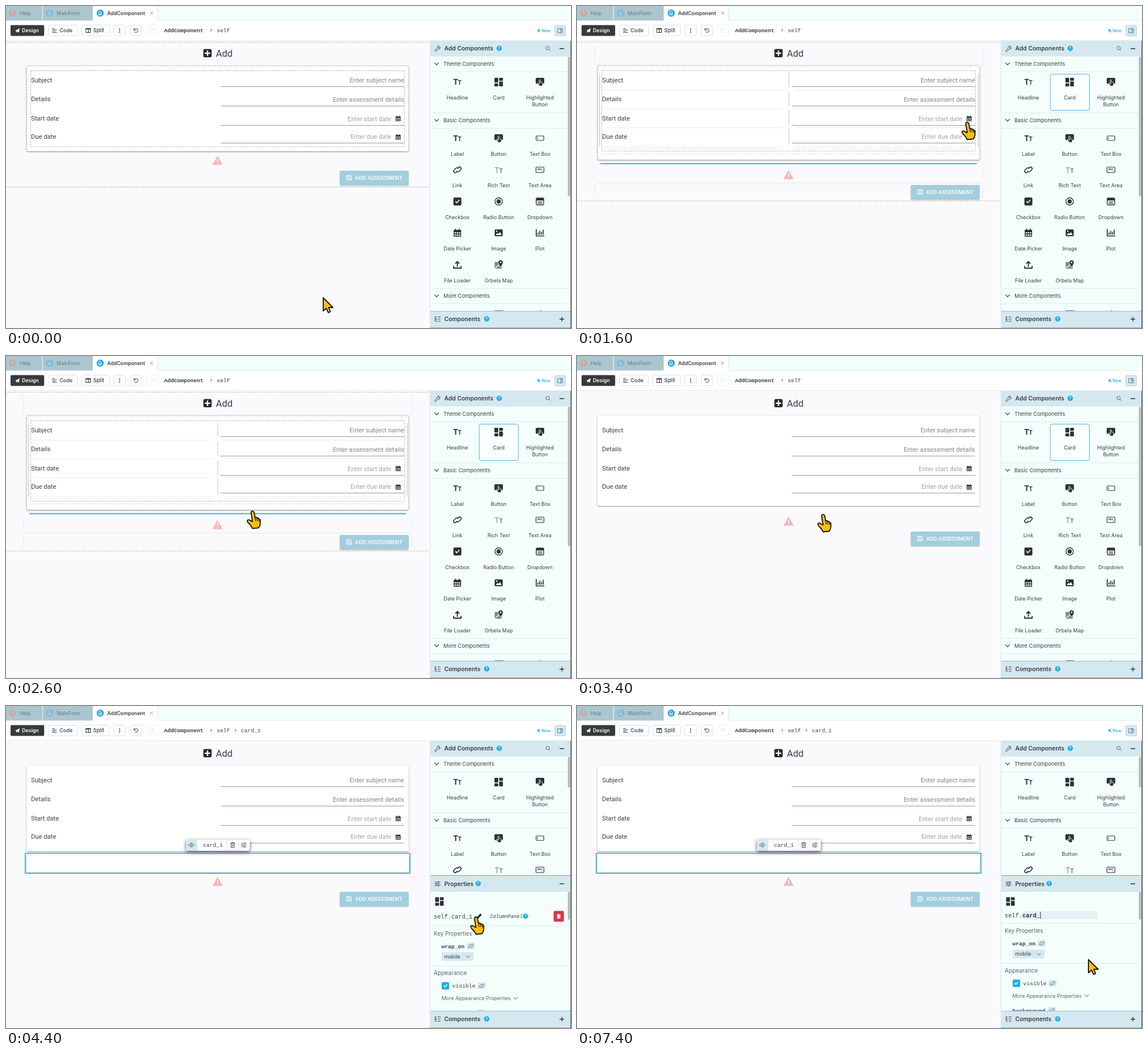
These frames come from a looping animation (992 by 565 pixels, 8000 ms). An HTML page with a canvas:

```html
<!DOCTYPE html>
<html lang="en">
<head>
<meta charset="utf-8">
<title>Form designer</title>
<style>
html, body { margin: 0; width: 100%; height: 100%; overflow: hidden; background: #fff; }
canvas { display: block; width: 100%; height: 100%; }
</style>
</head>
<body>
<canvas id="stage" width="992" height="565"></canvas>
<script>
const ctx = document.getElementById('stage').getContext('2d');
const LOOP = 8000, STEP = 200;
const INK = '#2d3135', LABEL = '#3a3e42', BLUE = '#1eaee6', BAR = '#d5e8f0', MINT = '#f4fffc', EDGE = '#deebe9';
const UI = 'Inter, sans-serif', BODY = 'Roboto, sans-serif', MONO = '"Liberation Mono", monospace';

function box(x, y, w, h, fill, { r = 0, stroke, lw = 1, dash = [] } = {}) {
  ctx.beginPath();
  ctx.roundRect(x, y, w, h, r);
  if (fill) { ctx.fillStyle = fill; ctx.fill(); }
  if (stroke) {
    ctx.strokeStyle = stroke;
    ctx.lineWidth = lw;
    ctx.setLineDash(dash);
    ctx.stroke();
    ctx.setLineDash([]);
  }
}

function line(x1, y1, x2, y2, color, lw = 1, dash = []) {
  ctx.beginPath();
  ctx.moveTo(x1, y1);
  ctx.lineTo(x2, y2);
  ctx.strokeStyle = color;
  ctx.lineWidth = lw;
  ctx.setLineDash(dash);
  ctx.stroke();
  ctx.setLineDash([]);
}

function disc(x, y, r, color) {
  ctx.beginPath();
  ctx.arc(x, y, r, 0, 7);
  ctx.fillStyle = color;
  ctx.fill();
}

function text(str, x, y, size, { font = UI, color = LABEL, style = '', align = 'left' } = {}) {
  ctx.font = `${style} ${size}px ${font}`;
  ctx.fillStyle = color;
  ctx.textAlign = align;
  ctx.fillText(str, x, y);
}

function shape(x, y, d, { fill, stroke, lw = 1.3, scale = 1 } = {}) {
  const path = new Path2D(d);
  ctx.save();
  ctx.translate(x, y);
  ctx.scale(scale, scale);
  ctx.lineJoin = ctx.lineCap = 'round';
  if (fill) { ctx.fillStyle = fill; ctx.fill(path, 'evenodd'); }
  if (stroke) { ctx.strokeStyle = stroke; ctx.lineWidth = lw; ctx.stroke(path); }
  ctx.restore();
}

function shadowed(blur, dy, color, draw) {
  ctx.save();
  ctx.shadowBlur = blur;
  ctx.shadowOffsetY = dy;
  ctx.shadowColor = color;
  draw();
  ctx.restore();
}

function clipped(x, y, w, h, draw) {
  ctx.save();
  ctx.beginPath();
  ctx.rect(x, y, w, h);
  ctx.clip();
  draw();
  ctx.restore();
}

const HAND = 'M-2.5 1.5Q-2-1.5 .5-.8 2.5 0 3 2L4.5 10Q7 9 8 11.5 10.5 10.5 11.5 13 14 13 13.8 16L13.5 22Q13 26 10.5 28.5L0 29.5Q-2 25-5 22-9.5 18.5-9 15.5-7.5 13-4 15.5L0 17.5Z';
const KNUCKLES = 'M4.5 10L5.5 16M8 11.5L8.8 16M11.5 13L11.8 17';
const ARROW = 'M0 0V23L5.5 18.5 9 26 12.5 24.5 9.5 17H17Z';
const CHEVRON = 'M-3.5-1.8L0 1.8 3.5-1.8';
const LINK = 'M-.5 2.6L-2 4.1A2.6 2.6 0 0 1-5.8.3L-2.8-2.7A2.6 2.6 0 0 1 1-2.7M.5-2.6L2-4.1A2.6 2.6 0 0 1 5.8-.3L2.8 2.7A2.6 2.6 0 0 1-1 2.7';
const SLIDERS = 'M-4.5-3H4.5M-4.5 0H4.5M-4.5 3H4.5M2-4V-2M-2-1V1M1 2V4';
const TREE = 'M-4-4V3.5H-1M-4-.2H-1M-4-4H-2M1-4H5M1-.2H5M1 3.5H5';
const TRASH = 'M-4-3H4M-1.5-3V-4.5H1.5V-3M-3-3V4.5H3V-3M-1-1V2.5M1-1V2.5';

function typeIcon(x, y, color, style) {
  text('T', x - 7.5, y + 5, 13.5, { style, color });
  text('T', x + .8, y + 5, 10, { style: '700', color: color === INK ? INK : '#777' });
}

const icons = {
  type: (x, y) => typeIcon(x, y, INK, '700'),
  rich: (x, y) => typeIcon(x, y, '#9a9d9f', '500'),
  card(x, y) {
    box(x - 7.5, y - 7, 6.7, 8.3, INK, { r: 1 });
    box(x + .8, y - 7, 6.7, 5.2, INK, { r: 1 });
    box(x - 7.5, y + 2.7, 6.7, 5.2, INK, { r: 1 });
    box(x + .8, y - .4, 6.7, 8.3, INK, { r: 1 });
  },
  button(x, y) {
    box(x - 7.5, y - 7, 15, 10.5, INK, { r: 2 });
    shape(x - .5, y - 3.5, HAND, { fill: INK, stroke: '#fff', lw: 2.4, scale: .38 });
  },
  field(x, y) {
    box(x - 6.7, y - 4, 13.4, 8, null, { r: 1.5, stroke: INK, lw: 1.2 });
    line(x - 4, y - 1.7, x - 4, y + 1.7, INK);
  },
  link: (x, y) => shape(x, y, LINK, { stroke: INK, lw: 1.6 }),
  area(x, y) {
    box(x - 7, y - 4.8, 14, 9.6, null, { r: 1, stroke: INK, lw: 1.1 });
    text('abc', x - 5, y + .8, 5, { style: '700' });
    line(x + 3, y + 3, x + 5, y + 1, INK, .8);
  },
  check(x, y) {
    box(x - 7, y - 7, 14, 14, INK, { r: 2 });
    shape(x, y, 'M-3 0L-1 2.3 3.2-2.2', { stroke: '#fff', lw: 1.6 });
  },
  radio(x, y) {
    shape(x, y, 'M-6.5 0A6.5 6.5 0 1 1 6.5 0A6.5 6.5 0 1 1-6.5 0', { stroke: INK, lw: 1.4 });
    disc(x, y, 3.7, INK);
  },
  list(x, y) {
    box(x - 6.5, y - 6, 13, 12, null, { r: 1.5, stroke: INK, lw: 1.4 });
    box(x - 6.5, y - 6, 13, 4.3, INK);
    line(x - 4, y + .8, x + 4, y + .8, INK, 1.2);
    line(x - 4, y + 3.3, x + 4, y + 3.3, INK, 1.2);
  },
  date: (x, y) => calendar(x, y, 1.35),
  image(x, y) {
    box(x - 7, y - 6, 14, 12, INK, { r: 1.5 });
    shape(x, y, 'M-5.3 4L-2 0 0 2 2-1.5 5.3 4Z', { fill: '#fff' });
    disc(x - 3.4, y - 3, 1.3, '#fff');
  },
  plot: (x, y) => shape(x, y, 'M-6.5-6V5.5H7M-3.3 2.5V0M-.3 2.5V-3M2.7 2.5V-1M5.7 2.5V-5', { stroke: INK, lw: 1.7 }),
  upload(x, y) {
    shape(x, y, 'M0 3V-5M-3-2.5L0-5.7 3-2.5M-6.5 3V6H6.5V3', { stroke: INK, lw: 1.9 });
  },
  map(x, y) {
    box(x - 7, y - 5, 12.5, 12, '#85898b', { r: 1 });
    line(x - 6, y + 6, x + 5, y - 4, '#fff', 1.4);
    shape(x + 3.5, y - 1, 'M0 5Q-4.2-.5-4.2-3A4.2 4.2 0 0 1 4.2-3Q4.2-.5 0 5Z', { fill: INK, stroke: '#fff', lw: .7 });
    disc(x + 3.5, y - 4, 1.4, '#fff');
  }
};

function calendar(x, y, s) {
  shape(x, y, 'M-4.8-3.8H4.8V5H-4.8ZM-3.8-.8V.8H-1.8V-.8ZM-1-.8V.8H1V-.8ZM1.8-.8V.8H3.8V-.8ZM-3.8 2V3.8H-1.8V2ZM-1 2V3.8H1V2ZM1.8 2V3.8H3.8V2Z', { fill: INK, scale: s });
  shape(x, y, 'M-2.4-5V-3.5M2.4-5V-3.5', { stroke: INK, lw: 1.2, scale: s });
}

function help(x, y) {
  disc(x, y, 4.7, BLUE);
  text('?', x, y + 2.5, 7, { color: '#fff', style: '600', align: 'center' });
}

function linkChip(x, y) {
  box(x - 7, y - 6, 14, 12, BAR, { r: 2 });
  shape(x, y, LINK, { stroke: '#56666e', lw: 1.5, scale: .62 });
}

function tabs() {
  box(0, 0, 992, 26, '#f2fffb');
  box(0, 0, 63.5, 25.5, '#abc6cf');
  box(64.5, 0, 88, 25.5, '#abc6cf');
  box(152.5, 0, 114, 26, '#fff');
  line(266.5, 0, 266.5, 25, '#d8e6e6');
  line(267, 25.5, 992, 25.5, '#e1efed');
  disc(11.5, 12.5, 6, '#c8aaa5');
  text('?', 11.5, 15.4, 8, { color: '#e3d1cd', style: '600', align: 'center' });
  [[76.5, '#79b9d5', '#c0dce7'], [165.5, '#20a3df', '#fff']].forEach(([x, bg, fg]) => {
    disc(x, 12.5, 6.2, bg);
    shape(x, 12.5, 'M-2.3-3.2H.8L2.3-1.7V3.2H-2.3ZM-1 .2H1M-1 1.7H1', { stroke: fg, lw: .9 });
  });
  text('Help', 24, 15.6, 8.8, { color: '#637a83' });
  text('MainForm', 89, 15.6, 8.8, { color: '#637a83' });
  text('AddComponent', 177.5, 15.6, 8.75, { style: '600' });
  shape(255.5, 12.5, 'M-2.3-2.3L2.3 2.3M2.3-2.3L-2.3 2.3', { stroke: '#87959a', lw: 1 });
}

function toolbar(selected) {
  box(0, 26, 992, 35, '#fff');
  line(0, 60.5, 992, 60.5, '#e5eced');
  box(8, 33.5, 59, 19, '#38393b', { r: 2 });
  shape(20, 43, 'M-4 .5L4-4 2.7 3.5 0 2-1.7 4V1.3Z', { fill: '#fff' });
  text('Design', 28, 46.2, 8.8, { color: '#fff', style: '600' });
  [[74.5, 51], [133.5, 48], [189.5, 20], [218.5, 20], [246.5, 20]].forEach(([x, w], i) =>
    box(x, 33.5, w, 18.5, '#fff', { r: 2, stroke: i === 4 ? '#edf2f3' : '#d4e3e9' }));
  shape(85, 43, 'M-3.5-3.5H0M-3.5-1.2H4M-3.5 1.2H1.5M-3.5 3.5H4', { stroke: INK, lw: .9 });
  text('Code', 94, 46.2, 9, { style: '500' });
  shape(144.5, 43, 'M-4-3.5H4V3.5H-4ZM0-3.5V3.5M-4-2.4H4', { stroke: INK, lw: 1 });
  text('Split', 153, 46.2, 9.2, { style: '500' });
  [-3, 0, 3].forEach(d => disc(199.5, 43 + d, .9, INK));
  shape(228, 43, 'M-3.3-3.5V-.8H-.6M-3-1A3.4 3.4 0 1 1-2.2 2.3', { stroke: INK, lw: 1 });
  shape(256, 43, 'M3.3-3.5V-.8H.6M3-1A3.4 3.4 0 1 0 2.2 2.3', { stroke: '#e5eaec', lw: 1 });
  const crumb = (s, x, style) => text(s, x, 45.8, 9.6, { font: MONO, style });
  const next = x => shape(x, 42.5, 'M-1.2-2.2L1 0-1.2 2.2', { stroke: INK, lw: .9 });
  crumb('AddComponent', 277.5, 'bold');
  next(360.5);
  crumb('self', 370, '');
  if (selected) { next(403); crumb('card_1', 412.5, ''); }
  shape(935, 43, 'M0-3.5Q.4-.4 3 0 .4.4 0 3.5-.4.4-3 0-.4-.4 0-3.5ZM3 1.5V4M1.8 2.8H4.2M3-4V-2', { fill: BLUE, stroke: BLUE, lw: .5, scale: .85 });
  text('New', 940.3, 45.8, 7.3, { color: BLUE, style: '500' });
  box(963.5, 34, 19, 18.5, BAR, { r: 2, stroke: '#b9d5e1' });
  shape(973, 43.3, 'M-4-3.7H4V3.7H-4ZM1-3.7V3.7M2.2-1.7H3M2.2 0H3', { stroke: '#46748a', lw: .9 });
}

function dragGuides() {
  const pale = '#e9eaec', mid = '#bfc1c3';
  [63.5, 342].forEach(y => line(0, y, 744, y, '#e0b48f', 1, [2.5, 1.5]));
  [31, 713].forEach(x => [[68, 99], [286, 305], [314, 337]].forEach(([a, b]) => line(x, a, x, b, pale)));
  [103, 310.5].forEach(y => line(31, y, 713, y, pale));
  [39.5, 704.5].forEach(x => line(x, 118, x, 246, mid));
  [[117, 142], [150, 176], [183, 209], [216, 243]].forEach(([a, b]) => line(372, a, 372, b, mid));
  [147.5, 180.5, 213.5, 247, 250].forEach(y => {
    line(47, y, 361, y, pale);
    line(383, y, 694, y, pale);
  });
  line(43, 259.5, 700, 259.5, pale);
  line(41, 276.6, 702, 276.6, '#2ea7d1', 1.8);
}

function form({ grow, shift, dashed, dragging, selected }) {
  box(0, 61, 744, 504, '#fafafd');
  box(346.5, 75.5, 14.5, 14.5, '#26282a', { r: 2.5 });
  shape(353.8, 82.8, 'M-4 0H4M0-4V4', { stroke: '#fff', lw: 2.2 });
  text('Add', 368.5, 88.5, 16.5, { font: BODY });

  const cardPanel = (y, h) => shadowed(2.5, 1, 'rgba(0,0,0,.42)', () => box(36, y, 671, h, '#fffffe', { r: 2 }));
  cardPanel(105, 150 + grow);
  if (dashed) {
    const dash = [2.5, 1.5], tone = '#b9b6b1';
    if (!dragging) [63.5, 317.5].forEach(y => line(0, y, 744, y, '#b0b2b4', 1, dash));
    box(36.5, 105, 670.5, 150 + grow, null, { r: 2, stroke: tone, dash });
    box(43.5, 113.5, 656, 133.5 + grow / 2, null, { stroke: tone, dash });
  }
  if (dragging) dragGuides();

  [['Subject', 'Enter subject name', 129.5, 141.5],
   ['Details', 'Enter assessment details', 163, 175.5],
   ['Start date', 'Enter start date', 196.5, 209.5],
   ['Due date', 'Enter due date', 229, 240.5]].forEach(([label, hint, y, rule], i) => {
    const dated = i > 1;
    text(label, 44, y + 4.2, 11.2, { font: BODY });
    text(hint, dated ? 676.5 : 699, y + (i % 3 ? 5 : 4.2), 11.2,
      { font: BODY, color: dated ? '#a3a3a3' : '#858585', align: 'right' });
    line(377, rule, 699, rule, '#989898');
    if (dated) calendar(688.5, y + .8, .92);
  });

  if (selected) {
    cardPanel(262, 30);
    box(33.8, 258.5, 675.5, 35, null, { stroke: '#2aabdc', lw: 1.7 });
    quickBar();
  }
  shape(371.5, 271 + shift, 'M0-7L8 7.2H-8Z', { fill: '#f8b5b5', stroke: '#f8b5b5', lw: 1 });
  shape(371.5, 271 + shift, 'M0-2.5V2M0 4.7V4.9', { stroke: '#fff', lw: 1.7 });
  shadowed(2, 1, 'rgba(0,0,0,.2)', () => box(586, 289 + shift, 121, 25.7, '#a2cedd', { r: 2 }));
  shape(602.5, 301.3 + shift, 'M-4-4H2.5L4-2.5V4H-4ZM-2-4V-1.3H1.7V-4M-2 4V1H2V4', { stroke: '#fff', lw: 1 });
  text('ADD ASSESSMENT', 613, 304.7 + shift, 9.65, { font: BODY, color: '#fff', style: '500' });
}

function quickBar() {
  shadowed(6, 2, 'rgba(0,0,0,.65)', () => box(316, 234.5, 112, 19.5, '#fff', { r: 3 }));
  box(316, 234.5, 20, 19.5, BAR, { r: [3, 0, 0, 3] });
  shape(325.5, 244, 'M-5 0Q0-7 5 0Q0 7-5 0M-1.6 0A1.6 1.6 0 1 1 1.6 0A1.6 1.6 0 1 1-1.6 0', { stroke: '#4b565b', lw: .9 });
  text('card_1', 346, 247.2, 9.65, { font: MONO });
  [388, 408].forEach(x => line(x, 235, x, 254, '#d5e4ea'));
  shape(398, 244, TRASH, { stroke: INK, lw: .8 });
  shape(417.5, 244, SLIDERS, { stroke: INK, lw: .8 });
}

const sections = [
  ['Theme Components', 88, [
    ['type', 'Headline', 133], ['card', 'Card', 133], ['button', 'Highlighted Button', 133]]],
  ['Basic Components', 187, [
    ['type', 'Label', 232], ['button', 'Button', 232], ['field', 'Text Box', 232],
    ['link', 'Link', 287.5], ['rich', 'Rich Text', 287.5], ['area', 'Text Area', 287.5],
    ['check', 'Checkbox', 343], ['radio', 'Radio Button', 343], ['list', 'Dropdown', 343],
    ['date', 'Date Picker', 398], ['image', 'Image', 398], ['plot', 'Plot', 398],
    ['upload', 'File Loader', 454], ['map', 'Orbela Map', 454]]],
  ['More Components', 495, []]
];

function panelHead(title, y, h, glyph, helpX, open) {
  const mid = y + h / 2;
  box(744, y, 247, h, BAR);
  shape(757.5, mid, glyph, { stroke: INK, lw: .9 });
  text(title, 769.5, mid + 3.7, 10.25, { style: '600' });
  help(helpX, mid - .5);
  shape(976, mid, open ? 'M-3.5 0H3.5' : 'M-3.5 0H3.5M0-3.5V3.5', { stroke: INK, lw: 1.3 });
}

function palette(cardState) {
  box(744, 61, 248, 504, MINT);
  if (cardState) {
    box(831, 119.5, 68.7, 63.7, cardState === 'filled' ? BAR : '#f8fffe', { r: 3, stroke: '#4bb3da' });
  }
  sections.forEach(([title, top, items]) => {
    if (top > 88) line(744, top + .5, 986, top + .5, EDGE);
    line(744, top + 27.5, 986, top + 27.5, EDGE);
    shape(756, top + 13.5, CHEVRON, { stroke: INK, lw: 1.1 });
    text(title, 768, top + 17, 9.3);
    items.forEach(([icon, label, y], i) => {
      const x = [792.5, 865, 937.5][i % 3];
      icons[icon](x, y);
      const lines = label.length > 13 ? label.split(' ') : [label];
      lines.forEach((s, n) => text(s, x, y + 30.8 + n * 12, 9, { align: 'center' }));
    });
  });
  line(858, 534.5, 873, 534.5, '#8d9496', 1.4);
  line(937, 534.5, 940, 534.5, '#8d9496', 1);
}

function properties({ editing, name, picked, caret }) {
  box(744, 297, 247, 238, MINT);
  panelHead('Properties', 298, 28, SLIDERS, 829, true);
  line(744, 297.5, 991, 297.5, '#5cb4d5');
  icons.card(761, 342.5);
  const up = editing ? -4.5 : 0;
  const mono = (s, x, y, size, o) => text(s, x, y, size, { font: MONO, ...o });
  if (editing) {
    const caretX = 782.5 + name.length * 6.25;
    box(782, 360, 132, 14, '#e5f0f4');
    mono('self.', 751, 371, 10.3);
    if (picked) box(782, 361, 38, 12.5, '#1d58c9');
    mono(name, 782, 371, 10.3, { style: 'bold', color: picked ? '#fff' : INK });
    if (caret) line(caretX, 361, caretX, 373.5, INK);
  } else {
    mono('self.card_1', 751, 372.7, 10.3);
    shape(830.5, 369, 'M-5 5L-4 1.5 2.5-5 5-2.5-1.5 4Z', { fill: INK });
    mono('ColumnPanel', 850, 372, 8.65, { style: 'italic' });
    help(912, 368.7);
    box(961.5, 359.5, 18, 19, '#dc3545', { r: 2.5 });
    shape(970.5, 369, TRASH, { fill: '#fff', stroke: '#fff', lw: 1.1, scale: .8 });
  }
  const grey = { color: '#5b6367' };
  const rule = y => line(744, y + up, 986, y + up, EDGE);
  rule(386);
  text('Key Properties', 751, 402.7 + up, 9.75, grey);
  mono('wrap_on', 764.5, 424.5 + up, 9.65, { style: 'bold' });
  linkChip(816, 421 + up);
  box(765, 432 + up, 56, 15, BAR, { r: 2 });
  text('mobile', 769.5, 442.8 + up, 8.9);
  shape(811, 440 + up, CHEVRON, { stroke: INK, lw: 1, scale: .8 });
  rule(456);
  text('Appearance', 751, 472.4 + up, 10.1, grey);
  box(765, 484.5 + up, 13, 13, BLUE, { r: 2 });
  shape(771.5, 491 + up, 'M-2.6 0L-.8 1.9 2.8-1.9', { stroke: '#fff', lw: 1.4 });
  mono('visible', 783.5, 494 + up, 9.7);
  linkChip(835, 491 + up);
  text('More Appearance Properties', 764.5, 516.2 + up, 8.95, grey);
  shape(894.5, 513 + up, CHEVRON, { stroke: INK, lw: .9 });
  mono('background', 764.5, 542 + up, 9.65, { style: 'bold' });
  linkChip(834, 538.5 + up);
}

function sidePanel(s) {
  clipped(744, 61, 248, s.selected ? 236 : 474, () => palette(s.cardState));
  if (s.selected) clipped(744, 297, 248, 238, () => properties(s));
  const bar = (y, h) => box(986.5, y, 4, h, '#b4bbba', { r: 2 });
  bar(89, s.selected ? 54 : 245);
  if (s.selected) bar(326, 49);
  panelHead('Add Components', 61, 27.5, 'M-4.5 3L-.5-1A3 3 0 0 1 3-4.5L1.8-2.7 3-1.2 4.6-2.3A3 3 0 0 1 1 1L-3 5Z', 866, true);
  shape(951.5, 74.3, 'M-3.5-.5A3 3 0 1 1 2.5-.5A3 3 0 1 1-3.5-.5M1.7 1.7L4 4', { stroke: '#53646c', lw: .9 });
  panelHead('Components', 535, 29, TREE, 844, false);
  line(744, 535.5, 991, 535.5, '#8ac3d9');
  line(744, 564.5, 991, 564.5, '#72bbd7');
  line(744.5, 61, 744.5, 565, '#d7e6e9');
  line(991.5, 61, 991.5, 565, '#4c5659');
}

// [time, x, y]; eased between neighbours
const route = [
  [0, 557, 512], [800, 850, 158], [1000, 850, 158], [1200, 822, 169], [2200, 433, 271],
  [3400, 432, 279], [3800, 432, 279], [4400, 825, 371], [5000, 828, 370], [5600, 898, 445], [LOOP, 898, 445]
];

function pointer(t) {
  const i = route.findIndex(k => k[0] > t);
  const [t0, x0, y0] = route[i - 1], [t1, x1, y1] = route[i];
  const p = (t - t0) / (t1 - t0), e = p * p * (3 - 2 * p);
  const x = x0 + (x1 - x0) * e, y = y0 + (y1 - y0) * e;
  const hand = (t >= 600 && t < 4000) || (t >= 4400 && t < 5200);
  shape(x, y, hand ? HAND : ARROW, { fill: '#ffbe0b', stroke: '#111', lw: 1.8 });
  if (hand) shape(x, y, KNUCKLES, { stroke: '#111', lw: 1.3 });
}

function stateAt(t) {
  const selected = t >= 3600;
  const dragging = t >= 1600 && t < 3400;
  const settling = t >= 3400 && !selected;
  return {
    selected, dragging,
    dashed: t < 3400,
    grow: dragging ? 15 : settling ? 8 : 0,
    shift: selected ? 37 : dragging ? 25 : settling ? 19 : 0,
    cardState: t < 800 || selected ? '' : t < 1600 ? 'filled' : 'outlined',
    editing: t >= 5000,
    picked: t < 6200,
    name: t < 7200 ? 'card_1' : 'card_',
    caret: (t >= 6200 && t < 6800) || t >= 7200
  };
}

function render(now) {
  const t = Math.floor((now % LOOP) / STEP) * STEP;
  const state = stateAt(t);
  tabs();
  toolbar(state.selected);
  form(state);
  sidePanel(state);
  pointer(t);
}

const start = performance.now();
function tick() {
  render(performance.now() - start);
  requestAnimationFrame(tick);
}
tick();
</script>
</body>
</html>
```
